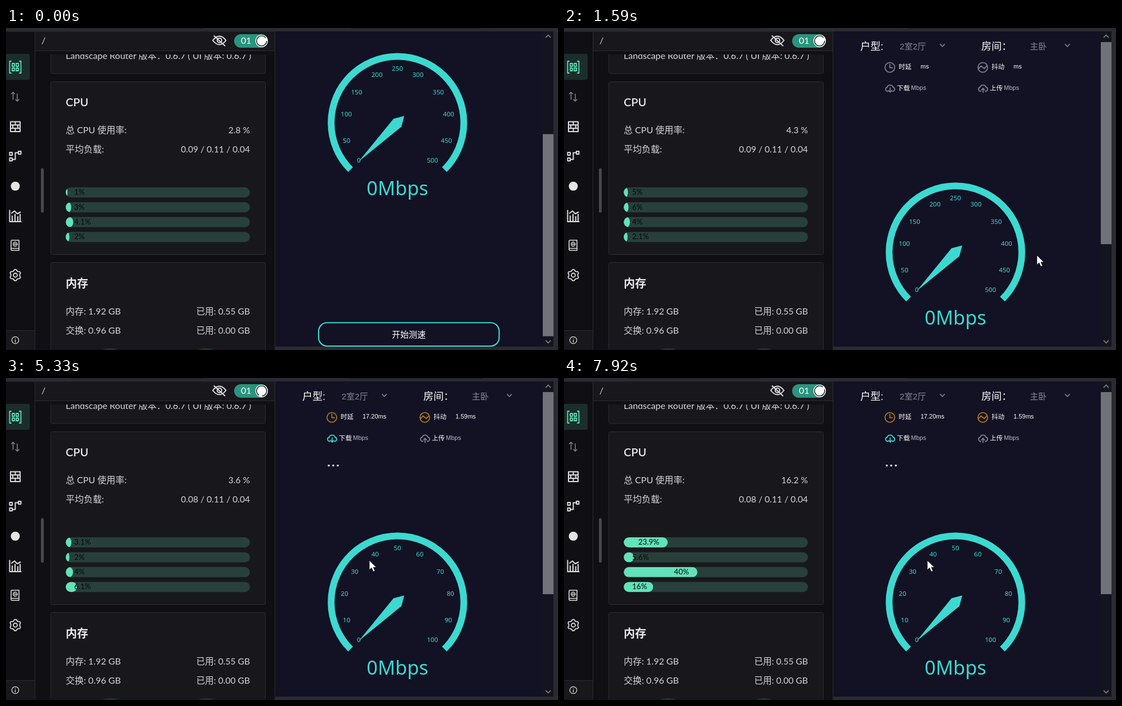
Recreate the animation shown at these times as an HTML page. Size 980 px wide and 572 px high, loop 7990 ms.

```html
<!DOCTYPE html>
<html lang="zh-CN">
<head>
<meta charset="utf-8">
<title>Router dashboard and speed test</title>
<style>
html, body { margin: 0; width: 100%; height: 100%; overflow: hidden; background: #101014; }
svg { display: block; width: 980px; height: 572px; }
text { white-space: pre; }
.dash { font: 16px Lato, "Noto Sans CJK SC", "Noto Sans CJK", sans-serif; fill: #d6d6d7; }
.page { font: 11.5px "Liberation Sans", "Noto Sans CJK SC", "Noto Sans CJK", sans-serif; fill: #fff; }
.dial { font: 11.6px "Noto Sans", sans-serif; fill: #3cd9d0; }
.title { font-size: 20px; font-weight: 600; fill: #eaeaeb; }
.end { text-anchor: end; font-size: 15.6px; }
.mid { text-anchor: middle; }
.card { fill: #18181c; stroke: #2d2d31; }
.line { fill: none; stroke: #dededf; stroke-width: 2; stroke-linejoin: round; stroke-linecap: round; }
.icon { fill: none; stroke: #7d7e8c; stroke-width: 1.8; stroke-linejoin: round; stroke-linecap: round; }
.bar { font-size: 13.5px; fill: #050808; }
</style>
</head>
<body>
<svg viewBox="0 0 980 572">
  <defs>
    <clipPath id="dashClip"><rect x="52" y="47" width="425" height="524"/></clipPath>
    <clipPath id="pageClip"><rect x="478" y="6" width="494" height="560"/></clipPath>
    <clipPath id="railClip"></clipPath>
    <path id="cloud" d="M5 13H4.500A3.800 3.800 0 0 1 4 5.500A5.300 5.300 0 0 1 14 5.500A3.800 3.800 0 0 1 13.500 13H13"/>
  </defs>

  <rect width="980" height="572" fill="#101014"/>
  <rect width="980" height="6.500" fill="#2a2a32"/>
  <path d="M115 .5H349M612 .5H845" stroke="#17171c"/>

  <!-- Dashboard -->
  <g class="dash">
    <rect x="52" y="7" width="425" height="33" fill="#18181c"/>
    <path d="M51.500 7V571M52 40.500H477M0 537.500H51" stroke="#2c2c30" fill="none"/>
    <path d="M0 538H51V571H0Z" fill="#18181c"/>
    <text x="63" y="28">/</text>

    <g class="line">
      <path d="M367 22Q379 7 390.500 22Q379 37 367 22Z"/>
      <circle cx="379" cy="22" r="4"/>
      <path d="M369.500 14L388.500 31.500"/>
    </g>
    <rect x="405" y="11" width="60" height="24" rx="12" fill="#2a947d"/>
    <text x="417" y="28" fill="#fff">01</text>
    <circle cx="453.800" cy="22.900" r="11" fill="#fff"/>
    <circle id="spinner" cx="453.800" cy="22.900" r="9" fill="none" stroke="#08110f" stroke-width="1.400" pathLength="100" stroke-dasharray="90 10"/>

    <path d="M0 46H39Q42 46 42 49V89Q42 92 39 92H0Z" fill="#1b2e2b"/>
    <g class="line">
      <path stroke="#63e2b7" stroke-width="1.800" d="M9 59H6.500V80H9M24 59H26.500V80H24M11 63H15V68H11ZM18 63H22V68H18ZM11 71H15V76H11ZM18 71H22V76H18Z"/>
      <path stroke="#818184" stroke-width="1.600" d="M12.500 127V114L9.500 117M12.500 114L15.500 117M20 117V130L17 127M20 130L23 127"/>
      <path d="M8 166.500H25V184H8ZM8 172.300H25M8 178.200H25M16.500 167V172M12 172V178M21 172V178M16.500 178V184"/>
      <path d="M6.500 221H11V226H6.500ZM22 219H26.500V224H22ZM6.500 231H11V236H6.500ZM11 233.500H16.500V221.500H22"/>
      <circle cx="16.500" cy="281" r="8" fill="#e4e4e5" stroke="none"/>
      <path d="M6.500 324V344H26.500M11 343V334M16 343V331M21 343V335M25 343V331M10 329L15 325L20 330L25.500 327"/>
      <path d="M10.500 377H23V395H10.500Q9 395 9 393V378.500Q9 377 10.500 377ZM9.500 391.500H23" stroke-width="1.600"/>
      <g stroke-width="1"><circle cx="16.300" cy="384" r="4"/><ellipse cx="16.300" cy="384" rx="1.700" ry="4"/><path d="M12.500 384H20"/></g>
      <path id="gear" stroke-width="1.800"/>
      <circle cx="16.500" cy="439" r="3.500" stroke-width="1.800"/>
      <circle cx="16.500" cy="554.500" r="6.200" stroke-width="1.300"/>
      <path d="M16.500 554V558M16.500 551.500V551.600" stroke-width="1.300"/>
    </g>

    <rect x="62" y="249" width="5" height="79" rx="2.500" fill="#48484b"/>
    <g clip-path="url(#dashClip)">
      <rect class="card" x="79.500" y="20.500" width="381" height="60.500" rx="3"/>
      <text x="106" y="55">Landscape Router 版本：0.6.7 ( UI 版本: 0.6.7 )</text>
      <rect class="card" x="79.500" y="95.500" width="381" height="307" rx="3"/>
      <text class="title" x="106" y="138.500">CPU</text>
      <text x="106" y="187">总 CPU 使用率:</text>
      <text id="usage" class="end" x="433" y="187"></text>
      <text x="106" y="221">平均负载:</text>
      <text id="load" class="end" x="433" y="221"></text>
      <g id="bars"></g>
      <rect class="card" x="79.500" y="416.500" width="381" height="180" rx="3"/>
      <text class="title" x="106" y="460.500" style="font-weight:700">内存</text>
      <text x="106" y="508.500">内存: 1.92 GB</text>
      <text class="end" x="433" y="508.500">已用: 0.55 GB</text>
      <text x="106" y="542.500">交换: 0.96 GB</text>
      <text class="end" x="433" y="542.500">已用: 0.00 GB</text>
      <g fill="none" stroke="#27564a" stroke-width="5"><circle cx="185" cy="638" r="66"/><circle cx="355" cy="638" r="66"/></g>
    </g>
  </g>

  <!-- Speed test page -->
  <rect x="477" y="6" width="503" height="566" fill="#2a2a32"/>
  <rect x="478" y="6" width="494" height="560" fill="#121224"/>
  <rect x="953" y="6" width="19" height="560" fill="#14141f"/>
  <path d="M958 17L962.500 12.500L967 17M958 555L962.500 559.500L967 555" fill="none" stroke="#74747b" stroke-width="1.800"/>
  <rect id="thumb" x="953" width="19" height="359" fill="#727279"/>
  <g class="page" clip-path="url(#pageClip)">
    <g id="content">
      <g font-size="18"><text x="526" y="38.500">户型:</text><text x="741" y="38.500">房间：</text></g>
      <g font-size="15" fill="#85869a"><text x="596" y="38">2室2厅</text><text x="827" y="38">主卧</text></g>
      <path d="M668 29L671.700 33L675.500 29M890 29L893.700 33L897.500 29" class="icon"/>
      <g id="delayIcon" class="icon"><circle cx="578.500" cy="70" r="8.600"/><path d="M578.500 64.500V70.500H583"/></g>
      <g id="jitterIcon" class="icon"><circle cx="743.500" cy="70" r="8.600"/><path d="M736 72L740.500 67.500L746 72L751 67"/></g>
      <g id="downIcon" class="icon" transform="translate(570 99.500)">
        <use href="#cloud"/><path d="M9 7V14M6.200 11.500L9 14.500L11.800 11.500"/>
      </g>
      <g class="icon" transform="translate(735 99.500)">
        <use href="#cloud"/><path d="M9 15V8M6.200 10.500L9 7.500L11.800 10.500"/>
      </g>
      <text x="594" y="73" font-weight="500">时延</text><text id="delay" x="633" y="72" font-size="11"></text>
      <text x="759" y="73" font-weight="500">抖动</text><text id="jitter" x="798" y="72" font-size="11"></text>
      <text x="591" y="110.500">下载</text><text x="756" y="110.500">上传</text>
      <g font-size="11" fill="#b9b9c3"><text x="616" y="110">Mbps</text><text x="781" y="110">Mbps</text></g>
      <path id="dots" d="M571.500 154H574.500V157H571.500ZM579.500 154H582.500V157H579.500ZM587.500 154H590.500V157H587.500Z"/>

      <g class="dial" transform="translate(695 398.300)">
        <path d="M-83.300 83.300A117.800 117.800 0 1 1 83.300 83.300" fill="none" stroke="#3cd9d0" stroke-width="12"/>
        <path d="M-69 69L-7 -7L12 -12L7 7Z"/>
        <g id="scale"></g>
        <text class="mid" y="128.400" font-size="34.300">0Mbps</text>
      </g>
      <g id="status">
        <text x="677" y="666" font-size="17.600" fill="#1c8fdb">状态：开始</text>
        <text x="685" y="688.500" font-size="16" font-weight="500">IP地址：</text>
      </g>
      <rect x="555" y="753.500" width="320.500" height="41.500" rx="15" fill="none" stroke="#3cd9d0" stroke-width="2.200"/>
      <text id="button" class="mid" x="715" y="780" font-size="15"></text>
    </g>
  </g>
  <path id="cursor" d="M0 0V17L4 13.300L7 20L10 18.700L7.200 12.300H12.500Z" fill="#fff" stroke="#111" stroke-width=".8"/>
</svg>
<script>
const LOOP = 7990, TEAL = '#3cd9d0', AMBER = '#b0741c', GREY = '#7d7e8c';
const RAIL = { x: 106, y: 283, width: 327, height: 18, step: 26.4, pad: 15 };
const REFRESH = { first: 415, period: 1100, transition: 200 };
const SCROLL = { start: 1046, end: 1446, from: 230 };
const CLICK = 400, DELAY_DONE = 2950, JITTER_DONE = 3600, DOWNLOAD = 4550;

// total usage followed by the four cores
const samples = [
  [2.8, 1, 3, 4.1, 2],
  [1.8, 1, 1, 3.1, 2.1],
  [4.3, 5, 6, 4, 2.1],
  [2.5, 1, 5.1, 1, 2],
  [2.0, 1, 2, 3.1, 2.1],
  [3.6, 3.1, 2, 4, 6.1],
  [9.1, 13.6, 2, 21.1, 8.6],
  [16.2, 23.9, 5.6, 40, 16]
];
// time, x, y
const cursorPath = [[70, 800, 556], [CLICK, 808, 544], [800, 844, 438], [1450, 844, 438],
  [1660, 838, 392], [2250, 645, 324]];

const $ = id => document.getElementById(id);
const clamp01 = v => Math.min(1, Math.max(0, v));
const smooth = v => { const p = clamp01(v); return p * p * (3 - 2 * p); };
const mix = (a, b, p) => a + (b - a) * p;

function add(parent, tag, attrs) {
  const node = document.createElementNS('http://www.w3.org/2000/svg', tag);
  for (const key in attrs) node.setAttribute(key, attrs[key]);
  return parent.appendChild(node);
}

function setText(node, value) {
  if (node.textContent !== value) node.textContent = value;
}

const bars = [0, 1, 2, 3].map(i => {
  const y = RAIL.y + i * RAIL.step;
  const shape = { x: RAIL.x, y, width: RAIL.width, height: RAIL.height, rx: 9, ry: 9 };
  add($('railClip'), 'rect', shape);
  add($('bars'), 'rect', { ...shape, fill: '#27403b' });
  return {
    fill: add($('bars'), 'rect', { ...shape, fill: '#63e2b7', 'clip-path': 'url(#railClip)' }),
    label: add($('bars'), 'text', { class: 'bar', y: y + 13.2 })
  };
});

const ticks = Array.from({ length: 11 }, (_, i) => {
  const step = i - 5, angle = step * 27 * Math.PI / 180, away = Math.abs(step);
  const shift = away < 3 ? 5 : away < 5 ? 0 : -6;
  return add($('scale'), 'text', {
    x: 102 * Math.sin(angle),
    y: -102 * Math.cos(angle) + shift + 4.2,
    'text-anchor': step < 0 ? 'start' : step > 0 ? 'end' : 'middle'
  });
});

$('gear').setAttribute('d', 'M' + Array.from({ length: 24 }, (_, i) => {
  const a = (i - .5) * Math.PI / 12, r = i % 4 < 2 ? 10 : 8;
  return `${16.5 + r * Math.sin(a)} ${439 - r * Math.cos(a)}`;
}).join('L') + 'Z');

function drawCpu(t) {
  const n = Math.max(0, Math.floor((t - REFRESH.first) / REFRESH.period) + 1);
  const now = samples[n], before = samples[Math.max(0, n - 1)];
  const changed = REFRESH.first + (n - 1) * REFRESH.period;
  const p = smooth((t - changed) / REFRESH.transition);
  setText($('usage'), now[0].toFixed(1) + ' %');
  setText($('load'), (n < 5 ? '0.09' : '0.08') + ' / 0.11 / 0.04');
  bars.forEach(({ fill, label }, i) => {
    const width = RAIL.width * mix(before[i + 1], now[i + 1], p) / 100;
    fill.setAttribute('width', width);
    setText(label, now[i + 1] + '%');
    const inside = width - RAIL.pad - label.getComputedTextLength();
    label.setAttribute('x', RAIL.x + Math.max(RAIL.pad, inside));
  });
}

function drawSpeedTest(t) {
  const p = smooth((t - SCROLL.start) / (SCROLL.end - SCROLL.start));
  $('content').setAttribute('transform', `translate(0 ${-SCROLL.from * (1 - p)})`);
  $('thumb').setAttribute('y', mix(188.5, 25, p));
  $('status').style.display = t < CLICK ? 'none' : '';
  setText($('button'), t < CLICK ? '开始测速' : '停止');
  setText($('delay'), (t < DELAY_DONE ? '' : '17.20') + 'ms');
  setText($('jitter'), (t < JITTER_DONE ? '' : '1.59') + 'ms');
  $('delayIcon').style.stroke = t < DELAY_DONE ? GREY : AMBER;
  $('jitterIcon').style.stroke = t < JITTER_DONE ? GREY : AMBER;
  $('downIcon').style.stroke = t < DOWNLOAD ? GREY : TEAL;
  $('dots').style.display = t < DOWNLOAD ? 'none' : '';
  ticks.forEach((tick, i) => setText(tick, String(i * (t < DOWNLOAD ? 50 : 10))));
}

function drawCursor(t) {
  $('cursor').style.display = t < cursorPath[0][0] ? 'none' : '';
  const next = cursorPath.findIndex(k => k[0] > t);
  const b = cursorPath[next < 0 ? cursorPath.length - 1 : next];
  const a = next > 0 ? cursorPath[next - 1] : b;
  const p = a === b ? 1 : smooth((t - a[0]) / (b[0] - a[0]));
  $('cursor').setAttribute('transform', `translate(${mix(a[1], b[1], p)} ${mix(a[2], b[2], p)})`);
}

function draw() {
  const t = performance.now() % LOOP;
  drawCpu(t);
  drawSpeedTest(t);
  drawCursor(t);
  $('spinner').setAttribute('transform', `rotate(${t * 360 / 1598} 453.8 22.9)`);
  requestAnimationFrame(draw);
}
draw();
</script>
</body>
</html>
```
